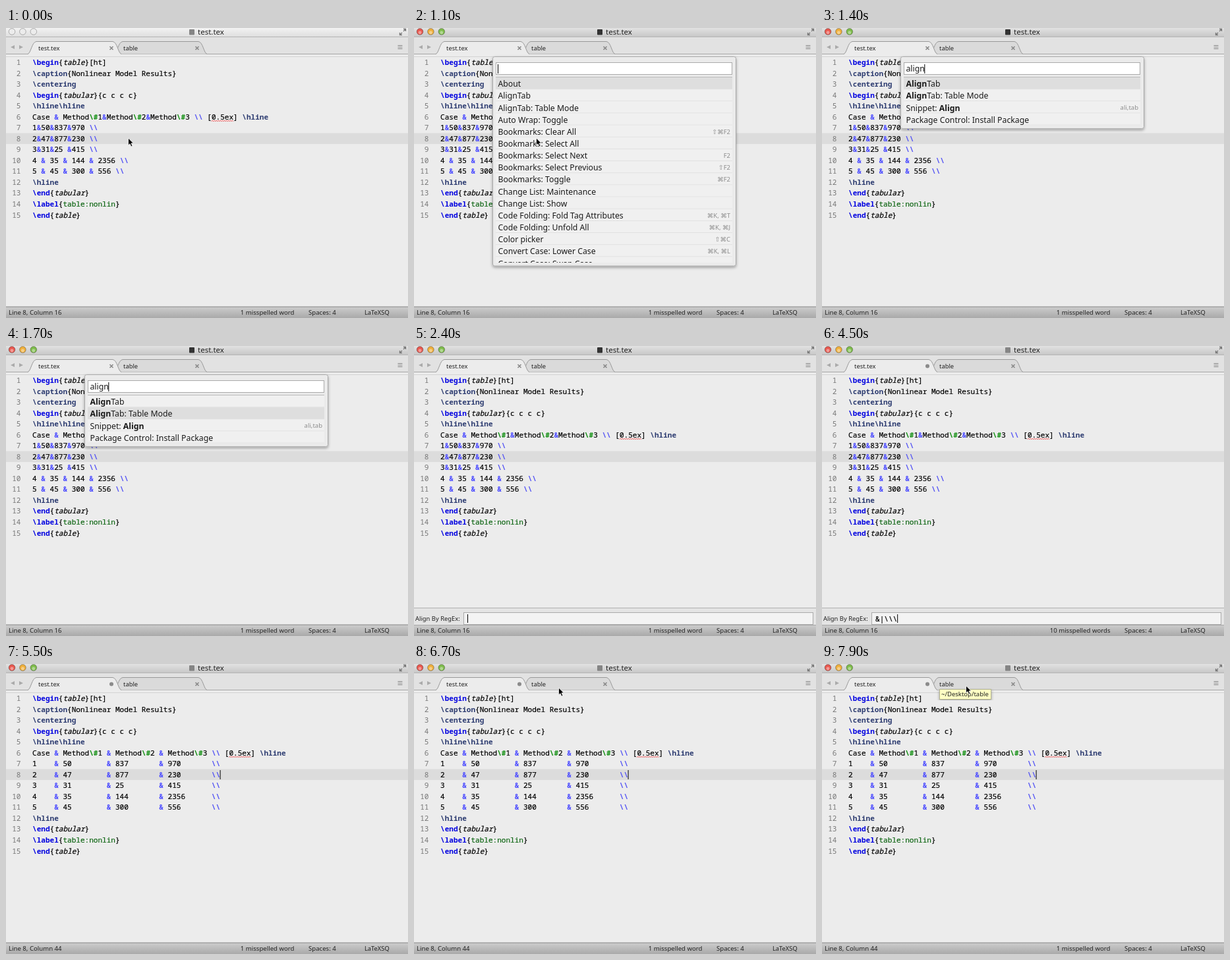
Recreate the animation shown at these times as an HTML page. Size 610 by 440 pixels, loop 8 s.

```html
<!DOCTYPE html>
<html lang="en">
<head>
<meta charset="utf-8">
<style>
  html, body { margin: 0; width: 100%; height: 100%; overflow: hidden; background: #ececec; }
  svg { display: block; }
  text { white-space: pre; font: 9.6px "Noto Sans", "DejaVu Sans", sans-serif; fill: #222; }
  .code { font: 500 11.05px "Noto Sans Mono", monospace; fill: #000; stroke: #000; stroke-width: .2; }
  .code tspan { stroke: none; }
  .num { fill: #777; stroke: none; }
  .menu { font-size: 12.25px; fill: #1a1a1a; }
  .keys { font-size: 9.5px; fill: #8c8c8c; }
  .env { fill: #0000e0; font-weight: bold; }
  .cmd { fill: #2c3b70; font-weight: bold; }
  .code .arg { font-style: italic; stroke: #000; }
  .code .ref { fill: #0b6410; stroke: #0b6410; }
  .hash { fill: #078a07; font-weight: bold; }
  .amp { fill: #4b4bff; font-weight: bold; }
  .brk { fill: #5454f4; font-weight: bold; }
</style>
</head>
<body>
<svg id="stage" width="610" height="440" viewBox="0 0 610 440">
  <defs>
    <linearGradient id="title" x2="0" y2="1"><stop stop-color="#e2e2e2"/><stop offset="1" stop-color="#c6c6c6"/></linearGradient>
    <linearGradient id="titleIdle" x2="0" y2="1"><stop stop-color="#f2f2f2"/><stop offset="1" stop-color="#dedede"/></linearGradient>
    <linearGradient id="status" x2="0" y2="1"><stop stop-color="#cdcdcd"/><stop offset="1" stop-color="#a9a9a9"/></linearGradient>
    <filter id="shadow" x="-5%" y="-5%" width="110%" height="115%"><feDropShadow dx="0" dy="2" stdDeviation="2" flood-opacity=".35"/></filter>
  </defs>
  <g id="scene"></g>
</svg>
<script>
const LOOP = 8000, CHAR = 6.63, LINE = 16.54, LEFT = 40, ROW = 18.16;
const FOCUS = 100, MENU = 900, PICK = 1600, PANEL = 2200, MOUSE_BACK = 5900, TIP = 7300;
const KEYS = [1200, 1250, 1300, 1350, 1400];
const REGEX_KEYS = [3300, 4000, 4150, 4250, 4400, 4900];
const APPLY = 5500;

const MENU_ITEMS = [
  ['About'], ['AlignTab'], ['AlignTab: Table Mode'], ['Auto Wrap: Toggle'],
  ['Bookmarks: Clear All', '⇧⌘F2'], ['Bookmarks: Select All'], ['Bookmarks: Select Next', 'F2'],
  ['Bookmarks: Select Previous', '⇧F2'], ['Bookmarks: Toggle', '⌘F2'],
  ['Change List: Maintenance'], ['Change List: Show'],
  ['Code Folding: Fold Tag Attributes', '⌘K, ⌘T'], ['Code Folding: Unfold All', '⌘K, ⌘J'],
  ['Color picker', '⇧⌘C'], ['Convert Case: Lower Case', '⌘K, ⌘L'], ['Convert Case: Swap Case']
];
const MATCHES = [['AlignTab'], ['AlignTab: Table Mode'], ['Snippet: Align', 'ali,tab'], ['Package Control: Install Package']];

const HEADER = ['Case', 'Method\\#1', 'Method\\#2', 'Method\\#3'];
const DATA = [[1, 50, 837, 970], [2, 47, 877, 230], [3, 31, 25, 415], [4, 35, 144, 2356], [5, 45, 300, 556]];
const RAW = ['Case & Method\\#1&Method\\#2&Method\\#3', '1&50&837&970', '2&47&877&230', '3&31&25 &415',
  '4 & 35 & 144 & 2356', '5 & 45 & 300 & 556'];

const esc = s => s.replace(/&/g, '&amp;').replace(/</g, '&lt;');
const span = (cls, s) => `<tspan class="${cls}">${esc(s)}</tspan>`;
const text = (x, y, s, cls = '', extra = '') => `<text x="${x}" y="${y}" class="${cls}" ${extra}>${s}</text>`;
const rect = (x, y, w, h, fill, extra = '') => `<rect x="${x}" y="${y}" width="${w}" height="${h}" fill="${fill}" ${extra}/>`;
const circle = (x, y, r, fill, extra = '') => `<circle cx="${x}" cy="${y}" r="${r}" fill="${fill}" ${extra}/>`;
const path = (d, extra) => `<path d="${d}" ${extra}/>`;
const caret = (x, y, h) => rect(x, y, 1, h, '#000');
const count = (times, t) => times.filter(k => t >= k).length;
const blinkOn = (t, since) => (t - since) % 1000 < 500;

const pen = document.createElement('canvas').getContext('2d');
function menuWidth(s) {
  pen.font = '12.25px "Noto Sans", "DejaVu Sans", sans-serif';
  return pen.measureText(s).width;
}

// level 0: untouched, 1: aligned by &, 2: aligned by & and the row ends
function tableRows(level) {
  if (!level) return RAW;
  const widths = [4, 9, 9, level > 1 ? 9 : 0];
  return [HEADER, ...DATA].map(r => r.map((c, i) => String(c).padEnd(widths[i])).join(' & '));
}

function documentLines(level) {
  const rows = tableRows(level).map((r, i) => r + ' \\\\' + (i ? '' : ' [0.5ex] \\hline'));
  return ['\\begin{table}[ht]', '\\caption{Nonlinear Model Results}', '\\centering', '\\begin{tabular}{c c c c}',
    '\\hline\\hline', ...rows, '\\hline', '\\end{tabular}', '\\label{table:nonlin}', '\\end{table}'];
}

function highlight(line) {
  const token = /(\\begin|\\end|\\label)\{([^}]*)\}|(\\\\)|(\\#)|(\\[a-z]+)|(&)|[^\\&]+/g;
  return line.replace(token, (all, env, arg, brk, hash, cmd, amp) =>
    env ? span('env', env) + '{' + span(env === '\\label' ? 'ref' : 'arg', arg) + '}' :
    brk ? span('brk', brk) : hash ? span('hash', hash) : cmd ? span('cmd', cmd) :
    amp ? span('amp', amp) : esc(all));
}

function editor(level) {
  let out = rect(0, 159.5, 610, 16.6, '#dcdcdc');
  documentLines(level).forEach((line, i) => {
    const y = 56 + i * LINE;
    out += text(22.5, y, i + 1, 'code num', 'text-anchor="end"') + text(LEFT, y, highlight(line), 'code');
    const word = line.indexOf('0.5ex');
    if (word > 0) {
      out += path(`M${LEFT + word * CHAR} ${y + 3}` + 'l1.5 -1.5l1.5 1.5'.repeat(11), 'fill="none" stroke="#e33" stroke-width=".9"');
    }
  });
  return out;
}

function tab(x, right, fill, label, labelX, closeX, dirty) {
  const shape = `M${x} 39.5C${x + 5} 38 ${x + 6} 21.5 ${x + 13} 20.5H${right - 13}C${right - 6} 21.5 ${right - 5} 38 ${right} 39.5`;
  const mark = dirty ? circle(closeX, 30.5, 3, '#8b8b8b')
    : path(`M${closeX - 2.5} 28l5 5m0 -5l-5 5`, 'stroke="#888" stroke-width="1.6"');
  return path(shape, `fill="${fill}" stroke="#999"`) + text(labelX, 34, label, '', 'style="font-size:9.4px"') + mark;
}

function trafficLight(x, color, focused) {
  return focused
    ? circle(x, 5.5, 4.8, color, 'stroke="#0006" stroke-width=".8"') + circle(x, 7, 2.4, '#fff6')
    : circle(x, 5.5, 4.8, '#ececec', 'stroke="#999" stroke-width=".8"');
}

function chrome(focused, dirty) {
  const faded = dirty || !focused;
  let out = rect(0, 0, 610, 14, focused ? 'url(#title)' : 'url(#titleIdle)') + rect(0, 13, 610, 1, '#b4b4b4');
  ['#e9584f', '#f0b03c', '#7fbd4c'].forEach((color, i) => out += trafficLight(9 + i * 16.4, color, focused));
  out += rect(278, 2, 8, 8.5, faded ? '#858585' : '#333', 'rx="1"') + text(291, 10, 'test.tex', '', 'style="font-size:11.5px"');
  out += path('M603 5l3.5 -3.5m-3.5 0h3.5v3.5M601 7l-3.5 3.5m0 -3.5v3.5h3.5', 'fill="none" stroke="#777" stroke-width="1.3"');
  out += rect(0, 14, 610, 26, '#e2e2e2') + rect(0, 39, 610, 1, '#a6a6a6') + rect(0, 40, 610, 3, '#ececec') + rect(0, 43, 610, 1, '#d4d4d4');
  out += path('M13 26v6l-6 -3zM20 26v6l6 -3z', 'fill="#aaa"');
  out += path('M594.5 26.5h7m-7 2.5h7m-7 2.5h7', 'stroke="#888"');
  return out + tab(164, 305, '#dadada', 'table', 178, 290, false) + tab(33, 175, '#ececec', 'test.tex', 49, 160, dirty)
    + rect(34, 39, 140, 1.2, '#ececec');
}

function statusBar(column, misspelled) {
  return rect(0, 423, 610, 17, 'url(#status)') + rect(0, 422.5, 610, 1, '#858585')
    + text(4, 435, `Line 8, Column ${column}`)
    + text(437.5, 435, misspelled, '', 'text-anchor="end"')
    + text(459, 435, 'Spaces: 4') + text(544, 435, 'LaTeXSQ', '', 'style="font-size:9.3px"');
}

function menu(query, selected, showCaret) {
  const all = query.length > 1 ? MATCHES : MENU_ITEMS.filter(([name]) => /a/i.test(name) || !query);
  const bottom = Math.min(356, 75 + all.length * ROW);
  let rows = '';
  all.forEach(([name, keys], i) => {
    const y = 75 + i * ROW;
    const label = query ? name.replace(new RegExp(query, 'i'), m => `<tspan font-weight="bold">${m}</tspan>`) : name;
    rows += rect(124, y, 359, ROW, i === selected ? '#dedede' : '#f0f0f0') + rect(124, y + ROW - 1, 359, 1, '#e0e0e0')
      + text(127.5, y + 14.2, label, 'menu') + text(480, y + 13, keys || '', 'keys', 'text-anchor="end"');
  });
  return rect(119.5, 43.5, 369, bottom - 38.5, '#ebebeb', 'rx="3" stroke="#aaa" filter="url(#shadow)"')
    + rect(124.5, 52.5, 358, 18, '#fff', 'stroke="#aaa"')
    + text(127.5, 66, query, 'menu')
    + (showCaret ? caret(127 + menuWidth(query), 55, 14) : '')
    + `<svg x="0" y="0" width="610" height="${bottom}">${rows}</svg>` + rect(124, 74, 359, 1, '#bbb');
}

function regexPanel(value, showCaret) {
  return rect(0, 397, 610, 26, '#e4e4e4') + rect(0, 397, 610, 1, '#b0b0b0')
    + text(2, 417, 'Align By RegEx:', '', 'style="font-size:9.4px"')
    + rect(75.5, 404.5, 530, 18, '#f3f3f3', 'stroke="#aaa"')
    + text(81, 417.5, esc(value), 'code')
    + (showCaret ? caret(81 + value.length * CHAR, 407, 13) : '');
}

function pointer(t) {
  let x = 185.5, y = 167;
  if (t >= KEYS[0]) {
    if (t < MOUSE_BACK) return '';
    const p = Math.min(1, (t - MOUSE_BACK) / 600), e = p * p * (3 - 2 * p);
    const q = Math.min(1, Math.max(0, (t - 6700) / 200));
    x += 34 * e - q;
    y -= 131 * e + 3 * q;
  }
  return path(`M${x.toFixed(1)} ${y.toFixed(1)}v11l2.5 -2.3l1.9 4.2l2 -.9l-1.9 -4.1h3.4z`, 'fill="#000" stroke="#fff" stroke-width=".8"');
}

function scene(t) {
  const typed = count(REGEX_KEYS, t);
  const level = [0, 1, 0, 0, 0, 0, 2][typed];
  const column = [16, 38, 44][level];
  const misspelled = t >= 4300 && t < 5000 ? '10 misspelled words' : '1 misspelled word';
  let out = editor(level) + chrome(t >= FOCUS, typed > 0) + statusBar(column, misspelled);
  if (t >= MENU && t < PANEL) {
    const n = count(KEYS, t);
    out += menu('align'.slice(0, n), t >= PICK ? 1 : 0, blinkOn(t, n ? KEYS[n - 1] : MENU));
  } else if (t >= PANEL && t < APPLY) {
    out += regexPanel('&|\\\\\\\\'.slice(0, typed), blinkOn(t, typed ? REGEX_KEYS[typed - 1] : PANEL));
  } else if (t >= APPLY && blinkOn(t, APPLY)) {
    out += caret(LEFT + 43 * CHAR - .5, 161, 14);
  }
  if (t >= TIP) {
    out += rect(178.5, 38.5, 78, 15, '#ffffc4', 'stroke="#b5b590" filter="url(#shadow)"')
      + text(181, 49.3, '~/Desktop/table', '', 'style="font-size:9.5px"');
  }
  return out + pointer(t);
}

const target = document.getElementById('scene');
let shown = '';
function frame() {
  const next = scene(performance.now() % LOOP);
  if (next !== shown) target.innerHTML = shown = next;
  requestAnimationFrame(frame);
}
frame();
</script>
</body>
</html>
```
